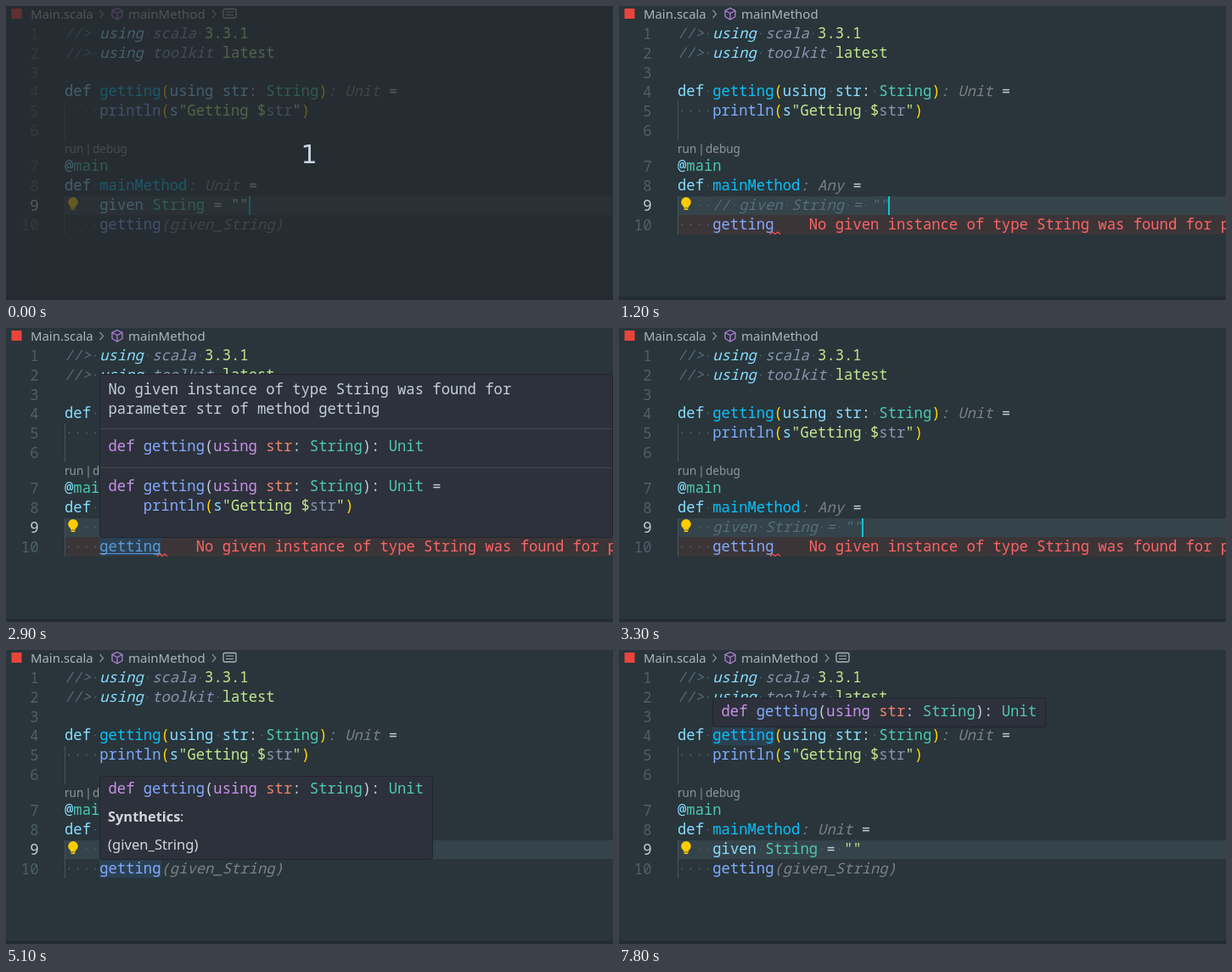
An HTML page for the animation above (8 s loop, 715x346 px).

```html
<!DOCTYPE html>
<html lang="en">
<head>
<meta charset="utf-8">
<title>Editor</title>
<style>
  html, body { margin: 0; width: 100%; height: 100%; overflow: hidden; background: #29353b; }
  svg { display: block; width: 715px; height: 346px; }
  .mono { font: 17.2px "Noto Sans Mono", "DejaVu Sans Mono", monospace; }
  .ui { font-family: "Noto Sans", "Open Sans", sans-serif; }
  .count { font: 30px "DejaVu Sans", sans-serif; }
  .it { font-style: italic; }
</style>
</head>
<body>
<svg id="stage" viewBox="0 0 715 346"></svg>
<script>
const LOOP = 8000, W = 10.32, LEFT = 69;
const stage = document.getElementById('stage');

// Token styles: colour and optional italic
const STYLES = {
  comment: ['#546e7a', 1], directive: ['#89ddff', 1], setting: ['#8796b0', 1],
  key: ['#89ddff'], def: ['#0ac0fa'], call: ['#82aaff'], type: ['#4ec9b0'],
  paren: ['#ffd700'], str: ['#c3e88d'], variable: ['#8796b0'], plain: ['#c3d0d8'],
  hint: ['#7b8183', 1], error: ['#ff6464'], link: ['#5c9ad6'],
  popKey: ['#c792ea'], popArg: ['#f0836b'], number: ['#4d5f68'], active: ['#c6d0d4']
};
const NO_DOTS = ['hint', 'error'];

const esc = s => s.replace(/&/g, '&amp;').replace(/</g, '&lt;').replace(/>/g, '&gt;');
const rect = (x, y, w, h, fill, more = '') =>
  `<rect x="${x}" y="${y}" width="${w}" height="${h}" fill="${fill}" ${more}/>`;
const stroke = (d, color, width = 1) =>
  `<path d="${d}" fill="none" stroke="${color}" stroke-width="${width}"/>`;
const label = (x, y, size, fill, text, more = '') =>
  `<text class="ui" x="${x}" y="${y}" font-size="${size}" fill="${fill}" ${more}>${esc(text)}</text>`;

const rowTop = n => n < 7 ? 21.5 + 22.8 * (n - 1) : 178 + 22.8 * (n - 7);
const baseline = n => Math.ceil(rowTop(n) + 16);
const colX = c => LEFT + c * W;

// Each token sits on the character grid; spaces become faint dots
function code(x, y, tokens, dots = true) {
  let out = '';
  for (const [style, text] of tokens) {
    const [color, italic] = STYLES[style];
    for (const part of text.match(/ |[^ ]+/g)) {
      if (part !== ' ') {
        out += `<text class="mono${italic ? ' it' : ''}" x="${x.toFixed(2)}" y="${y}" fill="${color}">${esc(part)}</text>`;
      } else if (dots && !NO_DOTS.includes(style)) {
        out += `<circle cx="${x + W / 2}" cy="${y - 5.5}" r="1" fill="#4b5e66"/>`;
      }
      x += part.length * W;
    }
  }
  return out;
}
const line = (n, tokens, col = 0) => code(colX(col), baseline(n), tokens);

const SIGNATURE = [['popKey', 'def '], ['call', 'getting'], ['plain', '('], ['popKey', 'using '],
  ['popArg', 'str'], ['plain', ': '], ['type', 'String'], ['plain', '): '], ['type', 'Unit']];
const PRINT = [['plain', '    '], ['call', 'println'], ['paren', '('], ['key', 's'],
  ['str', '"Getting $'], ['variable', 'str'], ['str', '"'], ['paren', ')']];
const ERROR = 'No given instance of type String was found for ';
const ERROR_END = 'parameter str of method getting';

// Editor state at a time in ms
function stateAt(t) {
  const within = (a, b) => t >= a && t < b;
  const blinkOn = [[0, 600], [1100, 1600], [2000, 2500], [3000, 3800], [4300, 4700],
    [5200, 5700], [6200, 6700], [7300, 7800]];
  return {
    dim: t < 100,
    commented: within(200, 3300),
    stale: within(500, 3600),
    any: within(600, 3700),
    hint: !within(200, 3700),
    error: within(1200, 4100),
    link: within(2700, 3300),
    errorPop: within(2800, 3300),
    callPop: within(5100, 6800),
    defMark: t >= 7600,
    defPop: t >= 7700,
    cursor: blinkOn.some(([a, b]) => within(a, b))
  };
}

function breadcrumb(s) {
  const grey = '#a9b6bc';
  const chevron = x => stroke(`M${x} 5l4 4.5l-4 4.5`, '#87959b', 1.2);
  let out = rect(6.5, 3, 12, 12, '#e8443c') +
    label(29, 14.5, 14.9, grey, 'Main.scala') + chevron(110.5) +
    stroke('M131 2.5l6 3v7l-6 3.5l-6-3.5v-7zM125 5.5l6 3l6-3M131 8.5v7.5', '#b180d7', 1.3) +
    label(144, 14.5, 15, grey, 'mainMethod');
  if (!s.any) {
    out += chevron(243) +
      rect(256, 3.5, 15, 10.5, 'none', `rx="1.5" stroke="${grey}" stroke-width="1.3"`) +
      stroke('M259 7h9M259 10.5h9', grey, 1.2);
  }
  return out;
}

function givenLine(s) {
  const pick = style => s.stale ? 'comment' : style;
  const tokens = [[pick('key'), 'given '], [pick('type'), 'String '],
    [s.commented ? 'comment' : pick('plain'), '= '], [s.commented ? 'comment' : pick('str'), '""']];
  if (s.commented) tokens.unshift(['comment', '// ']);
  return line(9, [['plain', '  '], ...tokens], 2);
}

function popup(y, h, body, w = 392) {
  return rect(110.5, y + .5, w, h, '#2d313b', 'rx="3" stroke="#20262c"') + body;
}

function popups(s) {
  const x = 120.5;
  let out = '';
  if (s.errorPop) {
    const rule = y => stroke(`M111 ${y}H714`, '#414650');
    out += popup(54, 192,
      code(x, 78, [['plain', ERROR]], false) + code(x, 101, [['plain', ERROR_END]], false) +
      rule(118.5) + code(x, 145, SIGNATURE, false) + rule(164.5) +
      code(x, 192, [...SIGNATURE, ['plain', ' =']], false) + code(x, 215, PRINT, false), 604);
  }
  if (s.callPop) {
    out += popup(148, 98, code(x, 169, SIGNATURE, false) +
      label(120, 202, 16.4, '#d3d7dd', 'Synthetics', 'font-weight="700"') +
      label(205, 202, 16.4, '#d3d7dd', ':') +
      label(120, 235, 16.6, '#d3d7dd', '(given_String)'));
  }
  if (s.defPop) out += popup(56, 34, code(x, 78, SIGNATURE, false));
  return out;
}

function draw(s) {
  let out = rect(0, 0, 715, 346, '#29353b') + rect(0, 342, 715, 4, '#222c31');
  out += rect(LEFT, 224, 646, 22, '#35434a');
  if (s.error) out += rect(LEFT, 246, 646, 23, '#3c3538');
  const mark = n => rect(110, Math.round(rowTop(n)), 73, 22, '#2b4153');
  if (s.defMark) out += mark(4);
  if (s.callPop || s.errorPop) out += mark(10);
  out += stroke('M69.5 112.5V158M69.5 224V269', '#45555c');

  for (let n = 1; n <= 10; n++) {
    const text = String(n);
    out += code(38.5 - text.length * W, baseline(n) + 1, [[n === 9 ? 'active' : 'number', text]]);
  }

  out += breadcrumb(s);
  out += line(1, [['comment', '//> '], ['directive', 'using '], ['setting', 'scala '], ['str', '3.3.1']]);
  out += line(2, [['comment', '//> '], ['directive', 'using '], ['setting', 'toolkit '], ['str', 'latest']]);
  out += line(4, [['key', 'def '], ['def', 'getting'], ['paren', '('], ['key', 'using str'],
    ['plain', ': '], ['type', 'String'], ['paren', ')'], ['hint', ': Unit '], ['plain', '=']]);
  out += line(5, PRINT);
  out += label(69, 173, 13.5, '#8d989d', 'run') + stroke('M97 162.5V176', '#8d989d') +
    label(102, 173, 13.5, '#8d989d', 'debug');
  out += line(7, [['key', '@'], ['type', 'main']]);
  out += line(8, [['key', 'def '], ['def', 'mainMethod'], ['hint', s.any ? ': Any ' : ': Unit '], ['plain', '=']]);
  out += givenLine(s);

  const last = [['plain', '    '], [s.link ? 'link' : 'call', 'getting']];
  if (s.hint) last.push(['hint', '(given_String)']);
  if (s.error) last.push(['error', '    ' + ERROR + ERROR_END]);
  out += line(10, last);
  if (s.link) out += stroke('M110.5 265.5H183', STYLES.link[0]);
  if (s.error) out += stroke('M178 268.5l3-2.5l3 2.5l3-2.5l3 2.5', '#f0524f', 1.2);

  // Light bulb
  out += '<circle cx="79" cy="230.8" r="5.8" fill="#ffcc00"/>' +
    rect(76, 234, 6, 3.5, '#ffcc00') + rect(76.5, 238.3, 5, 1.8, '#ffcc00', 'rx=".8"');

  if (s.cursor) out += rect(Math.round(colX(s.commented ? 24 : 21)), 224, 2, 22, '#0fc5d0');
  out += popups(s);
  if (s.dim) {
    out += rect(0, 0, 715, 346, 'rgb(38,42,46)', 'opacity=".7"') +
      '<text class="count" x="357" y="185" text-anchor="middle" fill="#ccd3e3">1</text>';
  }
  return out;
}

let shown = '';
const start = performance.now();
function frame() {
  const s = stateAt((performance.now() - start) % LOOP), key = JSON.stringify(s);
  if (key !== shown) {
    stage.innerHTML = draw(s);
    shown = key;
  }
  requestAnimationFrame(frame);
}
frame();
</script>
</body>
</html>
```
